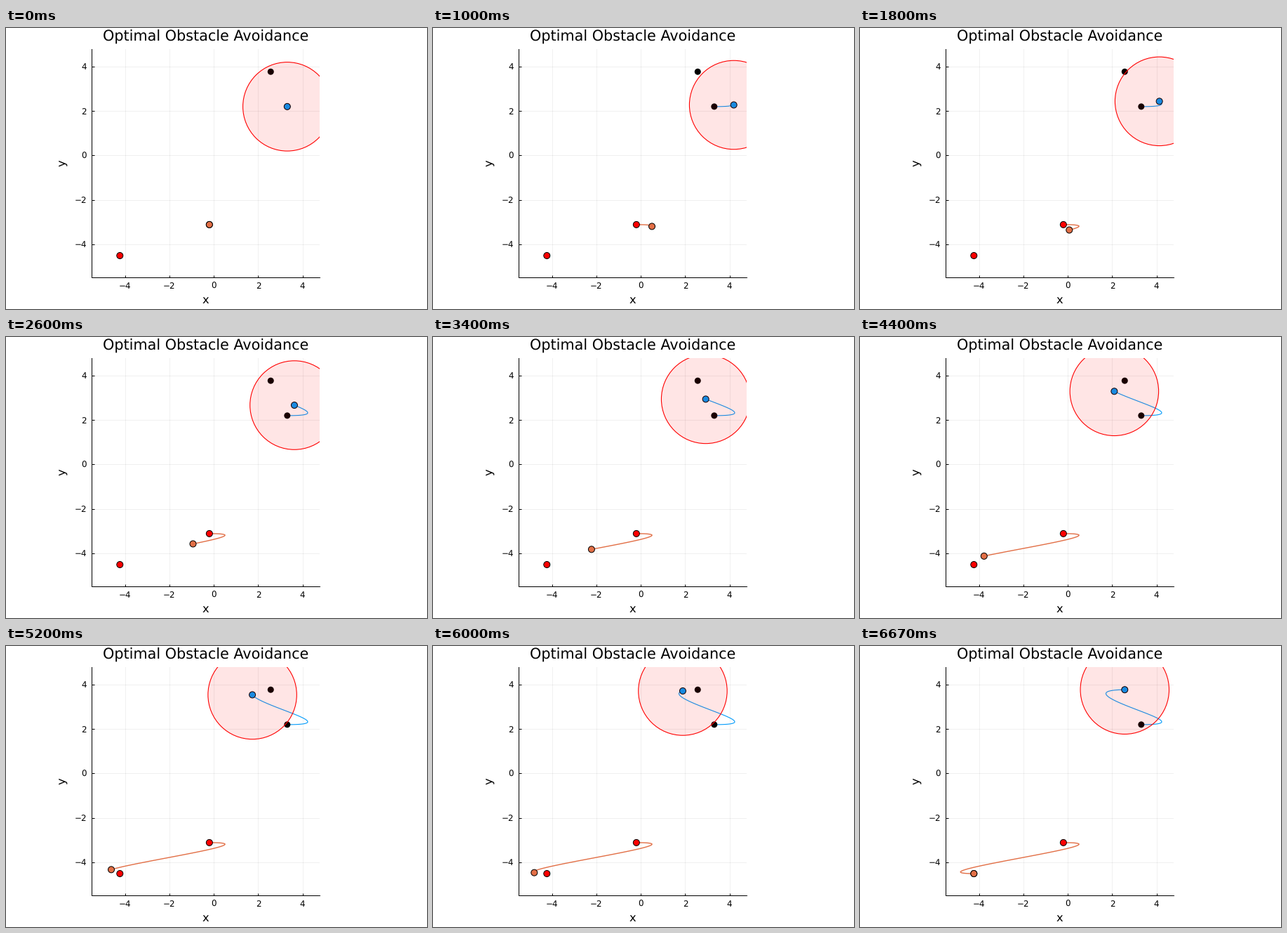
A matplotlib script that plays this animation: 600 by 400 pixels, repeating every 6.74 s.

```python
import numpy as np
import matplotlib.pyplot as plt
from matplotlib.animation import FuncAnimation
from matplotlib.patches import Circle

W, H, DPI = 600, 400, 100
STEPS = 100
LOOP_MS = 6740
SUB = 3  # ticks per animation step
PX = 72 / DPI  # points per pixel
LOW, HIGH = -5.5, 4.78
LEFT, TOP, SIZE = 122.3, 30.3, 325
SCALE = SIZE / (HIGH - LOW)
BLUE, ORANGE = "#009afa", "#e26f46"

plt.rcParams["font.family"] = "DejaVu Sans"
plt.rcParams["text.hinting"] = "none"


def trajectory(start, goal, bow=(0, 0)):
    """Minimum-effort path with unit speed along x at both ends."""
    k = np.arange(STEPS + 1) / STEPS
    knots = np.array([0, 1, STEPS, STEPS + 1]) / STEPS
    start, goal = np.array(start), np.array(goal)
    hop = np.array([0.1, 0])
    points = np.array([start, start + hop, goal, goal + hop])
    path = [np.polyval(np.polyfit(knots, points[:, i], 3), k)
            + bow[i] * (k * (1 - k)) ** 2 for i in (0, 1)]
    return np.array(path)


def label(x, y, text, size, **kw):
    fig.text(x / W, 1 - y / H, text, fontsize=size * PX,
             **{"ha": "center", "va": "baseline", **kw})


def disc(center, radius, z, **style):
    return ax.add_patch(Circle(center, radius, zorder=z, **style))


def dot(color, center, z, edge=1):
    return disc(center, 4.5 / SCALE, z, fc=color, ec="black", lw=edge * PX)


fig = plt.figure(figsize=(W / DPI, H / DPI), dpi=DPI, facecolor="white")
ax = fig.add_axes([LEFT / W, 1 - (TOP + SIZE) / H, SIZE / W, SIZE / H])
ax.set(xlim=(LOW, HIGH), ylim=(LOW, HIGH))
ticks = range(-4, 5, 2)
ax.set_xticks(ticks)
ax.set_yticks(ticks)
ax.tick_params(direction="in", length=3.5 * PX, width=PX,
               labelbottom=False, labelleft=False)
ax.grid(color="black", alpha=0.06, lw=PX)
ax.set_axisbelow(True)
ax.spines[["top", "right"]].set_visible(False)
ax.spines[["left", "bottom"]].set_linewidth(PX)

for t in ticks:
    name = str(t).replace("-", "\u2212")
    label(LEFT + (t - LOW) * SCALE, 371.2, name, 11.9)
    label(114.8, TOP + (HIGH - t) * SCALE + 4.5, name, 11.9, ha="right")
label(285, 18.6, "Optimal Obstacle Avoidance", 20.8)
label(284.5, 392, "x", 16.3)
label(85.3, 192.5, "y", 16.3, rotation=90, rotation_mode="anchor")

paths = [trajectory((3.31, 2.2), (2.565, 3.77), (-0.5, -0.89)),
         trajectory((-0.2, -3.115), (-4.235, -4.51))]
looks = [(BLUE, 1.1, "black", 0), (ORANGE, 1.4, "red", 1)]
trails, agents = [], []
for path, (color, width, end_color, edge) in zip(paths, looks):
    trails.append(ax.plot([], [], color=color, lw=width * PX, zorder=3)[0])
    for end in (0, -1):
        dot(end_color, path[:, end], 4, edge)
    agents.append(dot(color, path[:, 0], 5))

zone = disc(paths[0][:, 0], 2, 6, fc=(1, 0, 0, 0.1), ec="red", lw=1.1 * PX)


def draw(tick):
    n = min(round(tick / SUB), STEPS)
    for path, trail, agent in zip(paths, trails, agents):
        trail.set_data(path[0, :n + 1], path[1, :n + 1])
        agent.center = tuple(path[:, n])
    zone.center = tuple(paths[0][:, n])
    return [*trails, *agents, zone]


ticks_total = SUB * (STEPS + 1)
anim = FuncAnimation(fig, draw, frames=ticks_total,
                     interval=LOOP_MS / ticks_total,
                     repeat=True, repeat_delay=0)
plt.show()
```
